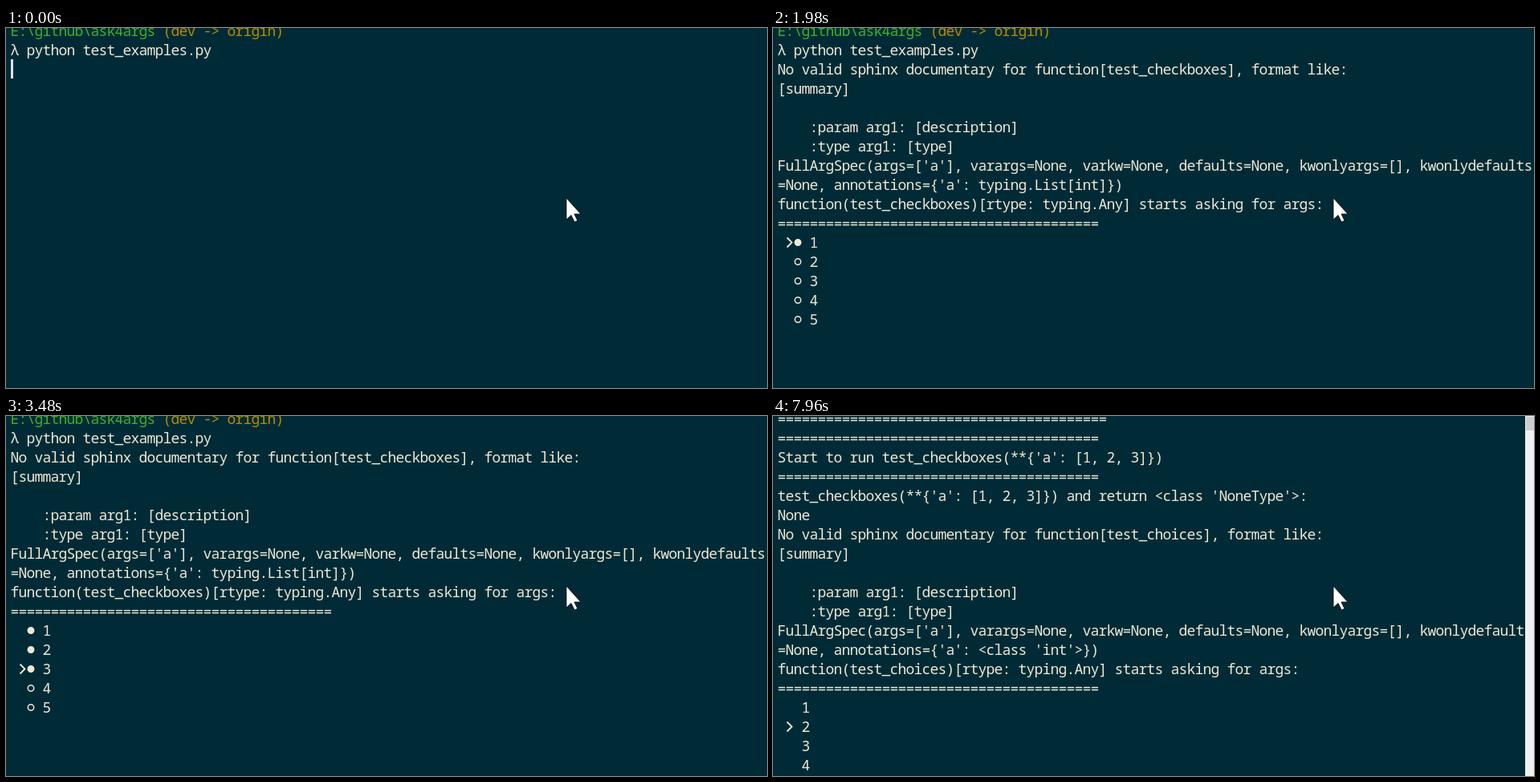
Animation, 948 px wide and 449 px high, one loop 8000 ms. Source, as an HTML page:

```html
<!DOCTYPE html>
<html lang="en">
<head>
<meta charset="utf-8">
<title>Terminal prompts</title>
<style>
  html, body { margin: 0; width: 100%; height: 100%; overflow: hidden; background: #002b36; }
  svg { display: block; }
  text {
    font: 18px "Noto Sans Mono", "DejaVu Sans Mono", monospace;
    letter-spacing: -.8px; /* 10px columns */
    white-space: pre;
    fill: #eee8d5;
  }
  .path { fill: #3fae2a; }
  .branch { fill: #b58900; }
  .caret { fill: #cfe6ee; }
  .dot { stroke: #eee8d5; stroke-width: 1.5; }
  .pointer { fill: none; stroke: #eee8d5; stroke-width: 1.8; }
</style>
</head>
<body>
<svg width="948" height="449" viewBox="0 0 948 449">
  <g id="screen"></g>
  <path d="M698 212V239L704 233.5L708.3 242L712 240.3L708 232H716Z" fill="#fff" stroke="#000" stroke-width=".8"/>
</svg>
<script>
const LOOP = 8000, COL = 10, ROW = 24, LEFT = 6;
const screen = document.getElementById('screen');
const rule = '='.repeat(40);

const usage = (name, type) => [
  `No valid sphinx documentary for function[${name}], format like:`,
  '[summary]',
  '',
  '    :param arg1: [description]',
  '    :type arg1: [type]',
  "FullArgSpec(args=['a'], varargs=None, varkw=None, defaults=None, kwonlyargs=[], kwonlydefaults",
  `=None, annotations={'a': ${type}})`,
  `function(${name})[rtype: typing.Any] starts asking for args:`
];

const command = ['', 'λ python test_examples.py'];
const first = [...command, ...usage('test_checkboxes', 'typing.List[int]')];
const second = [
  rule + '=', rule,
  "Start to run test_checkboxes(**{'a': [1, 2, 3]})",
  rule,
  "test_checkboxes(**{'a': [1, 2, 3]}) and return <class 'NoneType'>:",
  'None',
  ...usage('test_choices', "<class 'int'>"),
  rule
];

const checkboxes = (pointer, checked) => ({ lines: [...first, rule], prompt: true, count: 5, pointer, checked });
const choices = pointer => ({ lines: second, scrollbar: true, count: 4, pointer });

const steps = [
  [0, { lines: command, prompt: true, caret: true }],
  [500, { lines: first, prompt: true, caret: true }],
  [990, checkboxes(1, 0)],
  [1980, checkboxes(1, 1)],
  [2480, checkboxes(2, 2)],
  [3480, checkboxes(3, 3)],
  [4970, choices(1)],
  [7450, choices(3)],
  [7960, choices(2)]
];

function add(tag, attrs, text = '') {
  const node = document.createElementNS('http://www.w3.org/2000/svg', tag);
  for (const key in attrs) node.setAttribute(key, attrs[key]);
  node.textContent = text;
  screen.append(node);
}

function write(text, row, col = 0, style = '') {
  add('text', { x: LEFT - .4 + col * COL, y: 10 + row * ROW, class: style }, text);
}

function drawMenu({ lines, count, pointer, checked }) {
  const boxes = checked !== undefined;
  for (let i = 1; i <= count; i++) {
    const row = lines.length + i - 1, y = 3.5 + row * ROW;
    write(String(i), row, boxes ? 4 : 3);
    if (boxes) {
      add('circle', { cx: 31, cy: y, r: 3.7, class: 'dot', fill: i <= checked ? '#eee8d5' : 'none' });
    }
    if (i === pointer) add('path', { d: `M17.5 ${y - 6}l6 6l-6 6`, class: 'pointer' });
  }
}

function draw(state) {
  screen.replaceChildren();
  if (state.prompt) {
    write('E:\\github\\ask4args', 0, 0, 'path');
    write('(dev -> origin)', 0, 19, 'branch');
  }
  state.lines.forEach((line, row) => write(line, row));
  if (state.caret) {
    add('rect', { x: LEFT, y: state.lines.length * ROW - 9, width: 3, height: ROW, class: 'caret' });
  }
  if (state.count) drawMenu(state);
  if (state.scrollbar) {
    add('rect', { x: 937, y: 0, width: 11, height: 449, fill: '#f0f0f0' });
    add('rect', { x: 938, y: 1, width: 10, height: 17, fill: '#cdcdcd' });
  }
}

let shown;
function tick() {
  const time = performance.now() % LOOP;
  const [, state] = steps.findLast(([start]) => start <= time);
  if (state !== shown) draw(shown = state);
  requestAnimationFrame(tick);
}
tick();
</script>
</body>
</html>
```
